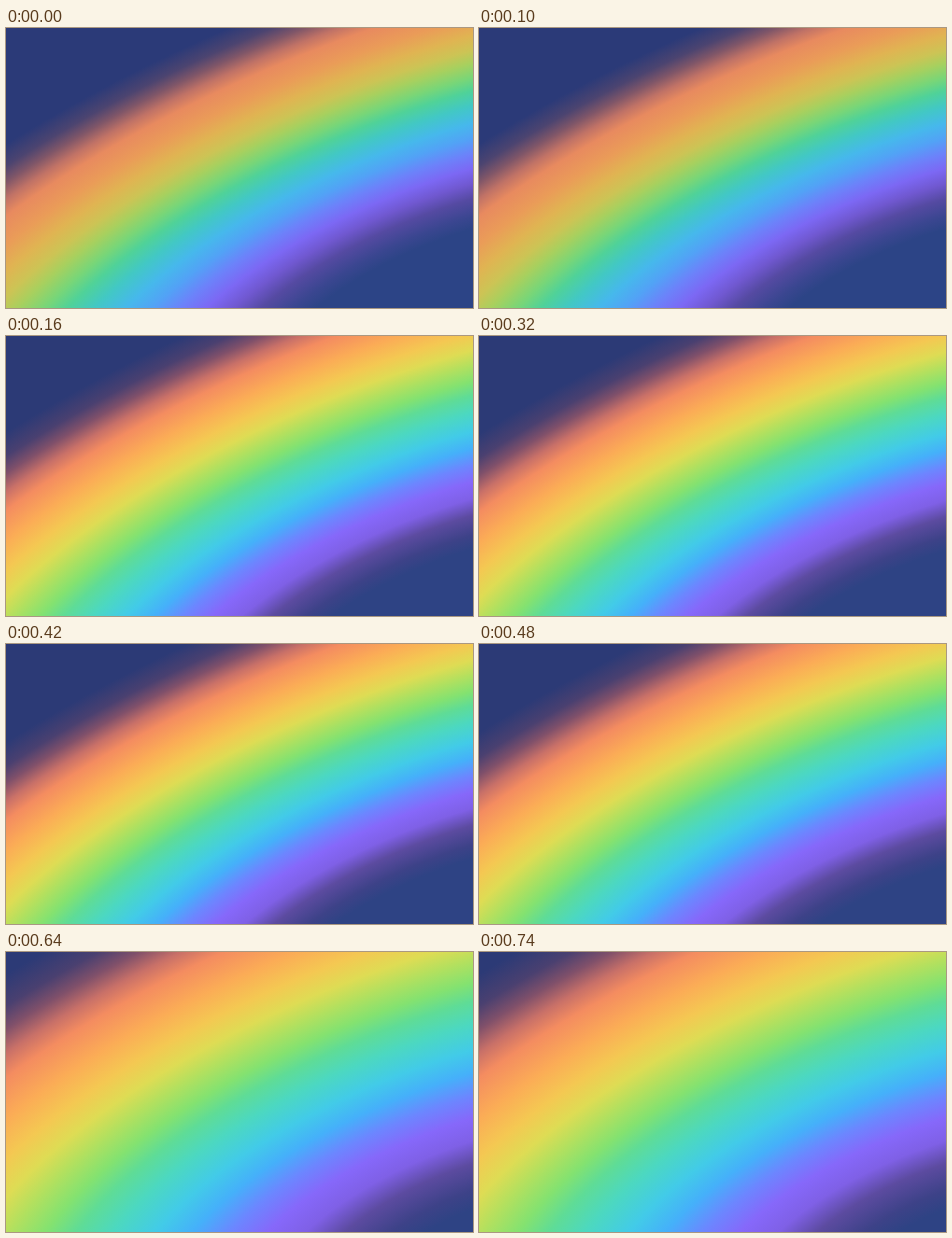
These frames come from a looping animation (500 px wide and 300 px high, 800 ms). An HTML page:

```html
<!DOCTYPE html>
<html lang="en">
<head>
<meta charset="utf-8">
<title>Rainbow</title>
<style>
  html, body { margin: 0; width: 100%; height: 100%; overflow: hidden; background: #2c3a76; }
  svg { display: block; width: 500px; height: 300px; }
</style>
</head>
<body>
<svg viewBox="0 0 500 300">
  <defs><radialGradient id="bow" gradientUnits="userSpaceOnUse"></radialGradient></defs>
  <rect width="500" height="300" fill="url(#bow)"/>
</svg>
<script>
const WIDTH = 500;
const HOLD = 160;
const REACH = 1.14;  // the glow fades a little beyond the outer rim
const SLOPE = 0.3;   // the bow climbs to the right
const FLAT = 0.45;   // height to width of the arcs

const offsets = [0, .05, .12, .18, .24, .3, .36, .42, .49, .55,
  .6, .66, .71, .77, .84, .92, .97, 1.02, 1.07, REACH];
const soft = ('#2c4486 #3a4690 #554aa2 #7058d0 #7c68f4 #6c82fa #52a2f6 #46b8ec #42c8c4 #50d298 ' +
  '#78d678 #a8d05e #ccc455 #e0b452 #ea9c58 #e88a5f #c07266 #805668 #4c4470 #2b3a78').split(' ');
const vivid = ('#2e4384 #3d4288 #5c4ba0 #7f60e6 #8668fa #6c86ff #45b0fa #42cbe8 #4cd8c0 #5fdc96 ' +
  '#84e270 #b4e05e #dedc54 #f4c852 #fbac56 #f48c60 #c87068 #80506a #4a4070 #2c3a76').split(' ');

// A rim as [cx, cy, r], given the height of its top before the slope
const rim = (cx, top, r) => [cx, top / FLAT + r, r];

const poses = [
  { inner: rim(500, 215, 221), outer: rim(462, -55, 707), colors: soft },
  { inner: rim(500, 228, 221), outer: rim(462, -72, 707), colors: vivid },
  { inner: rim(500, 230, 221), outer: rim(462, -70, 707), colors: vivid },
  { inner: rim(500, 238, 221), outer: rim(462, -78, 707), colors: vivid },
  { inner: rim(520, 275, 120), outer: rim(450, -130, 707), colors: vivid }
];

const bow = document.getElementById('bow');
bow.setAttribute('gradientTransform', `matrix(1 ${-SLOPE} 0 ${FLAT} 0 ${SLOPE * WIDTH})`);
const stops = offsets.map(o => {
  const stop = document.createElementNS(bow.namespaceURI, 'stop');
  stop.setAttribute('offset', o / REACH);
  return bow.appendChild(stop);
});

function setAll(names, values) {
  names.forEach((name, i) => bow.setAttribute(name, values[i]));
}

let shown = -1;
function draw(ms) {
  const index = Math.floor(ms / HOLD) % poses.length;
  if (index === shown) return;
  shown = index;
  const { inner, outer, colors } = poses[index];
  setAll(['fx', 'fy', 'fr'], inner);
  setAll(['cx', 'cy', 'r'], inner.map((v, i) => v + (outer[i] - v) * REACH));
  stops.forEach((stop, i) => stop.setAttribute('stop-color', colors[i]));
}

const start = performance.now();
function tick() {
  draw(performance.now() - start);
  requestAnimationFrame(tick);
}
tick();
</script>
</body>
</html>
```
